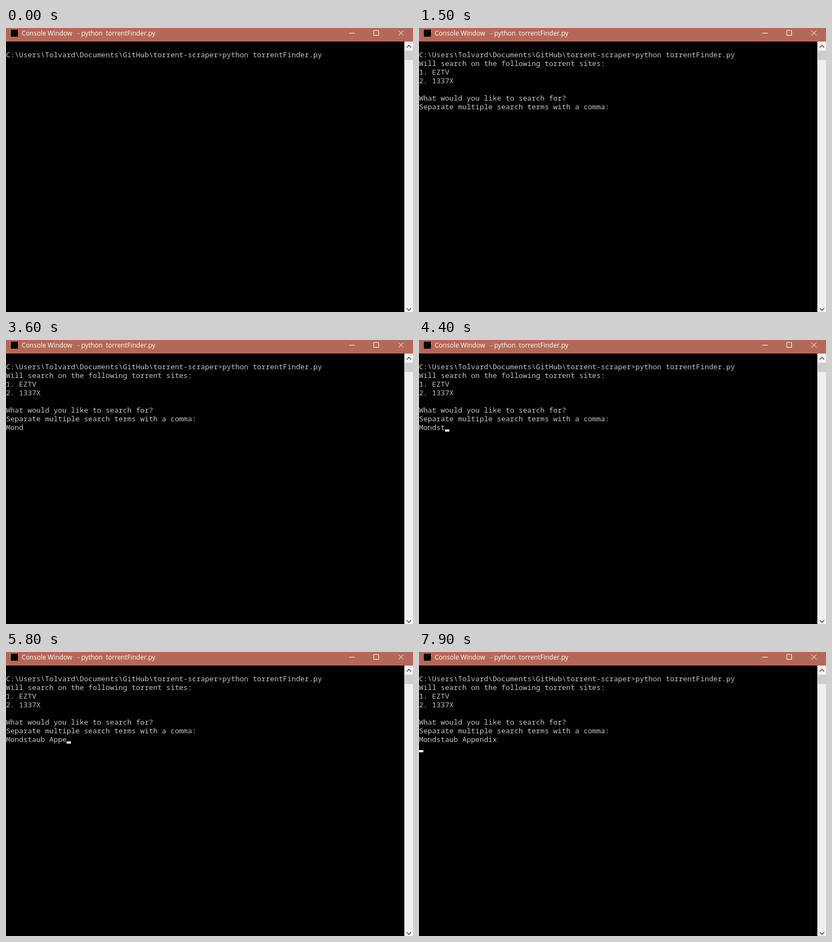
These frames come from a looping animation (752 by 524 pixels, 8 s). An HTML page:

```html
<!DOCTYPE html>
<html lang="en">
<head>
<meta charset="utf-8">
<title>Console</title>
<style>
html, body { margin: 0; width: 100%; height: 100%; overflow: hidden; background: #000; }
#stage { position: relative; width: 752px; height: 524px; overflow: hidden; background: #000; }
#stage > * { position: absolute; margin: 0; }
#bar { width: 752px; height: 25px; background: #b46858; }
.title { top: 1px; font: 12px/17px "Open Sans", sans-serif; color: #fff; white-space: pre; }
#screen { left: 0; top: 25px; font: calc(8px / .6)/16px "Noto Sans Mono", monospace; color: #c4c4c4; }
#cursor { width: 8px; height: 4px; background: #fff; }
</style>
</head>
<body>
<div id="stage">
  <div id="bar"></div>
  <span class="title" style="left:29px">Console Window</span>
  <span class="title" style="left:132px">- python  torrentFinder.py</span>
  <pre id="screen"></pre>
  <div id="cursor"></div>
  <svg width="752" height="524" fill="none">
    <rect x="9" y="3" width="13" height="13" fill="#000"/>
    <path d="M634 9.5h10M679.5 4.5h9v9h-9zM725 4.5l9.5 9.5M734.5 4.5l-9.5 9.5" stroke="#fff"/>
    <rect x="736" y="25" width="16" height="499" fill="#f0f0f0"/>
    <rect x="737" y="42" width="15" height="17" fill="#cdcdcd"/>
    <path d="M740.5 36l4-4 4 4M740.5 517l4 4 4-4" stroke="#505050" stroke-width="1.6"/>
  </svg>
</div>
<script>
const LOOP = 8000, OUTPUT_AT = 600, ENTER_AT = 6900;
const command = "\nC:\\Users\\Tolvard\\Documents\\GitHub\\torrent-scraper>python torrentFinder.py\n";
const output = `Will search on the following torrent sites:
1. EZTV
2. 1337X

What would you like to search for?
Separate multiple search terms with a comma:
`;
const query = "Mondstaub Appendix";
const keyTimes = [3000, 3200, 3400, 3600, 4100, 4400, 4500, 4600, 4700,
  4800, 5000, 5600, 5700, 5800, 6000, 6100, 6300, 6600];
const blinkTimes = [400, 1500, 2000, 2600, 3100, 3600, 4200, 5200, 5800, 6800, 6900, 7300, 7900];

const screenEl = document.getElementById("screen");
const cursorEl = document.getElementById("cursor");
const countPassed = (times, t) => times.filter(time => time <= t).length;

function render(t) {
  let text = command;
  if (t >= OUTPUT_AT) text += output + query.slice(0, countPassed(keyTimes, t));
  if (t >= ENTER_AT) text += "\n";
  if (screenEl.textContent !== text) screenEl.textContent = text;

  const lines = text.split("\n");
  const row = lines.length - 1;
  cursorEl.style.left = lines[row].length * 8 + "px";
  cursorEl.style.top = 25 + row * 16 + 12 + "px";
  cursorEl.style.visibility = countPassed(blinkTimes, t) % 2 ? "visible" : "hidden";
}

const start = performance.now();
function tick() {
  render((performance.now() - start) % LOOP);
  requestAnimationFrame(tick);
}
tick();
</script>
</body>
</html>
```
